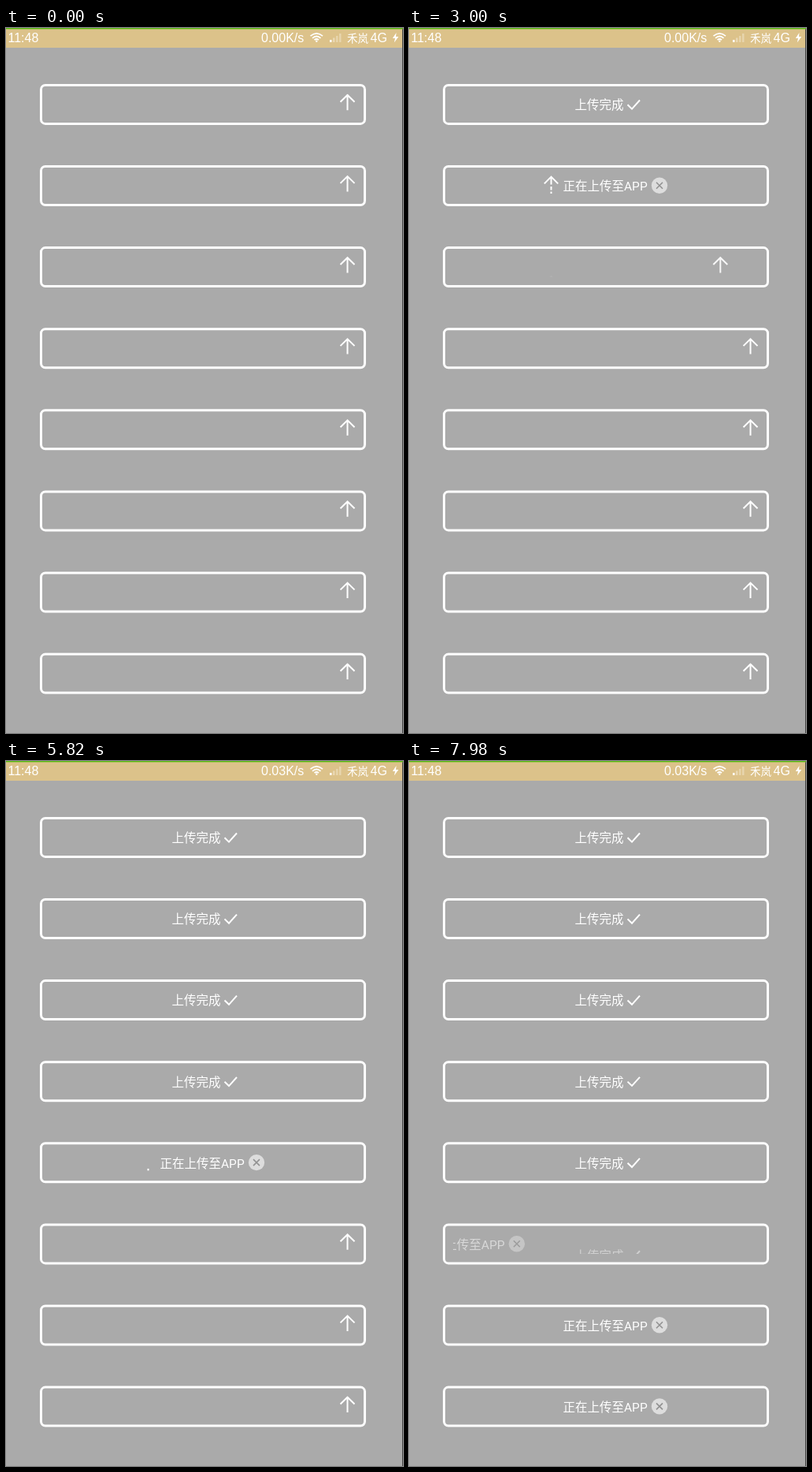
An HTML page for the animation above (8000 ms loop, 504 px wide and 894 px high).

```html
<!DOCTYPE html>
<html lang="zh">
<head>
<meta charset="utf-8">
<title>Upload buttons</title>
<style>
  html, body { margin: 0; width: 100%; height: 100%; overflow: hidden; background: #aaa; }
  svg { display: block; width: 100%; height: 100%; }
  .line { fill: none; stroke: #fff; stroke-width: 2; }
  .label { font: 15.5px Roboto, "Noto Sans CJK SC", "Noto Sans CJK", sans-serif; fill: #fff; }
  .bar { font: 16px "Liberation Sans", Arial, sans-serif; fill: #fff; }
  .carrier { font: 500 13.5px "Noto Sans CJK SC", "Noto Sans CJK", sans-serif; fill: #fff; }
</style>
</head>
<body>
<svg id="stage" viewBox="0 0 504 894" xmlns="http://www.w3.org/2000/svg">
  <defs>
    <clipPath id="inner"><rect x="56" y="-13.5" width="388" height="26"/></clipPath>
  </defs>
  <rect width="504" height="894" fill="#aaa"/>
  <rect width="504" height="25" fill="#dcc28a"/>
  <rect width="504" height="1.4" fill="#55b810"/>
  <g id="status">
    <text class="bar" x="2.5" y="18">11:48</text>
    <text class="bar" id="speed" x="324" y="18">0.00K/s</text>
    <g fill="none" stroke="#fff" stroke-width="1.7">
      <path d="M386.5 10.2Q394.3 3.6 402 10.2"/>
      <path d="M389 12.8Q394.3 8.2 399.500 12.8"/>
      <path d="M391.500 15.200Q394.300 12.800 397 15.200"/>
    </g>
    <circle cx="394.300" cy="16.700" r="1.200" fill="#fff"/>
    <g fill="#fff">
      <rect x="411" y="15" width="2.500" height="3"/>
      <rect x="415" y="12.500" width="2.500" height="5.500" opacity=".35"/>
      <rect x="419" y="10" width="2.500" height="8" opacity=".3"/>
      <rect x="423" y="7" width="2.500" height="11" opacity=".3"/>
      <path d="M495.500 6L490.800 13H494L492.800 18.500L498.300 11H495Z"/>
    </g>
    <text class="carrier" x="433" y="17.500">禾岚</text>
    <text class="bar" x="462.500" y="18">4G</text>
  </g>
  <g id="rows"></g>
  <rect x="503" y="1.400" width="1" height="893" fill="#444"/>
</svg>
<script>
const LOOP = 8000, STEP = 60;
const SLIDE = 300, TRAVEL = 400, RISE = 26;
const ICON_START = 1325, ICON_STEP = 296;
const SPEED_CHANGE = 4260;

// Start of the upload and of its completion for each row, in ms
const times = [
  [750, 2655], [1790, 3699], [2940, 4855], [3631, 5535],
  [4679, 6588], [5880, 7839], [6473, 8382], [7115, 9024]
];

const NS = "http://www.w3.org/2000/svg";
const speed = document.getElementById("speed");

function add(parent, tag, attrs = {}, text = "") {
  const el = document.createElementNS(NS, tag);
  for (const key in attrs) el.setAttribute(key, attrs[key]);
  el.textContent = text;
  parent.appendChild(el);
  return el;
}

function line(parent, d, extra = {}) {
  return add(parent, "path", { class: "line", d, ...extra });
}

function buildRow(_, i) {
  const row = add(document.getElementById("rows"), "g", {
    transform: `translate(0 ${97 + i * 103.1})`
  });
  add(row, "rect", {
    x: 44.5, y: -24.6, width: 411, height: 49, rx: 5.5,
    class: "line", style: "stroke-width:3"
  });
  const view = add(row, "g", { "clip-path": "url(#inner)" });

  const idle = add(view, "g");
  line(idle, "M424.500 -3.200L433.500 -12L442.500 -3.200M433.500 -12V7.300");

  const busy = add(view, "g");
  const head = line(busy, "M171.800 -2.700L180.500 -11.500L189.200 -2.700M180.500 -11.500V-1.500");
  const dash = line(busy, "M180.500 1V5.500");
  const dot = line(busy, "M180.500 7.500V10");
  add(busy, "text", { class: "label", x: 195.5, y: 6.2 }, "正在上传至APP");
  add(busy, "circle", { cx: 318, cy: -0.3, r: 10.2, fill: "#ddd" });
  line(busy, "M314 -4.300L322 3.700M322 -4.300L314 3.700", { style: "stroke:#929292;stroke-width:1.6" });

  const done = add(view, "g");
  add(done, "text", { class: "label", x: 210.5, y: 6.2 }, "上传完成");
  line(done, "M277.500 0.300L283 5.600L293 -5.500");

  return { idle, busy, done, head, dash, dot };
}

const rows = times.map(buildRow);

function progress(t, start) {
  const u = Math.min(1, Math.max(0, (t - start) / SLIDE));
  return (1 - Math.cos(Math.PI * u)) / 2;
}

// A part rises in with p and leaves to the left with q
function place(el, p, q) {
  el.setAttribute("transform", `translate(${-TRAVEL * q} ${RISE * (1 - p)})`);
  el.setAttribute("opacity", p * (1 - q));
}

function show(el, on) {
  el.setAttribute("visibility", on ? "visible" : "hidden");
}

function draw(t) {
  const phase = (Math.floor((t - ICON_START) / ICON_STEP) + 8) % 4;
  speed.textContent = t < SPEED_CHANGE ? "0.00K/s" : "0.03K/s";
  rows.forEach((row, i) => {
    const p = progress(t, times[i][0]);
    const q = progress(t, times[i][1]);
    place(row.idle, 1, p);
    place(row.busy, p, q);
    place(row.done, q, 0);
    show(row.head, phase === 1);
    show(row.dash, phase < 2);
    show(row.dot, phase !== 2);
  });
}

function tick() {
  const t = performance.now() % LOOP;
  draw(Math.floor(t / STEP) * STEP);
  requestAnimationFrame(tick);
}
tick();
</script>
</body>
</html>
```
